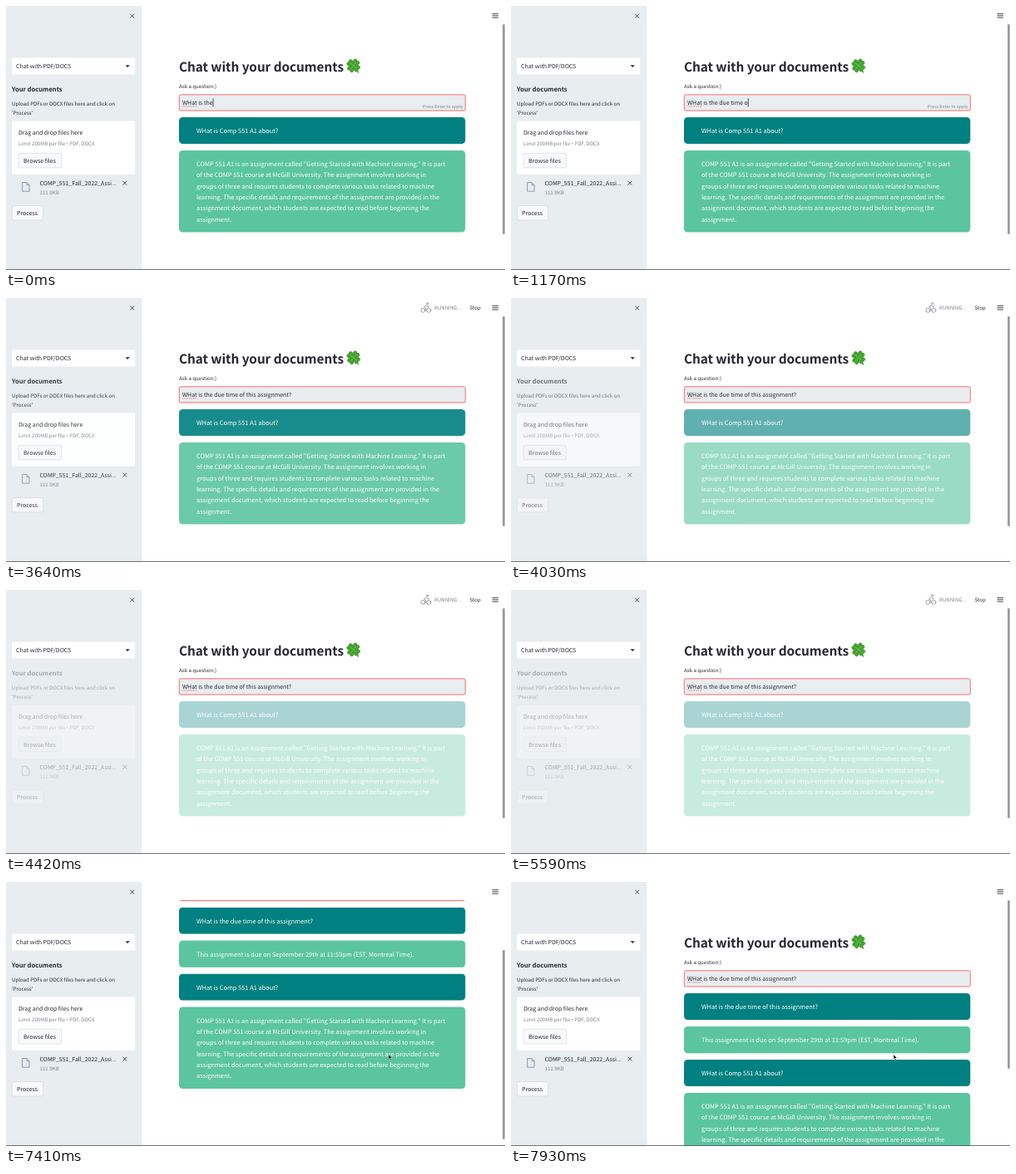
An HTML page that plays this animation: 600x318 px, repeating every 8000 ms.

```html
<!DOCTYPE html>
<html lang="en">
<head>
<meta charset="utf-8">
<title>Chat with your documents</title>
<style>
html, body { margin: 0; width: 100%; height: 100%; overflow: hidden; background: #fff; }
svg { display: block; width: 600px; height: 318px; }
text {
  font-family: "Noto Sans CJK SC", "Noto Sans CJK JP", "Noto Sans CJK", "Open Sans", sans-serif;
  font-size: 6.98px; fill: #262730; white-space: pre; text-rendering: geometricPrecision;
}
.small { font-size: 6.11px; }
.tiny { font-size: 5.24px; }
.card text { font-size: 7.44px; fill: #fff; }
.bold { font-weight: 700; }
.h1 { font-size: 15.4px; letter-spacing: -.08px; }
.h3 { font-size: 7.6px; }
.dim { fill: #7f838e; }
.teal { fill: #008080; }
.green { fill: #5bc5a0; }
.button { fill: #f8f9fb; stroke: #cfd3d7; stroke-width: .6; }
.line { fill: none; stroke: #31333f; stroke-width: .9; }

/* one shared 8 s clock */
.stale, .pushed, .answer, .running, .hint, .pointer, .page, .thumb {
  animation: 8s linear infinite;
}
.stale { animation-name: stale; }
.pushed { animation-name: pushed; animation-timing-function: step-end; }
.answer { animation-name: answer; animation-timing-function: step-end; }
.running { animation-name: running; animation-timing-function: step-end; }
.hint { animation-name: hint; animation-timing-function: step-end; }
.pointer { animation-name: pointer; animation-timing-function: step-end; }
.page { animation-name: page; }
.thumb { animation-name: thumb; }

@keyframes stale {
  0% { opacity: 1; }
  41.5% { opacity: 1; animation-timing-function: ease-in; }
  54% { opacity: .33; animation-timing-function: step-end; }
  78%, 100% { opacity: 1; }
}
@keyframes pushed { 0% { transform: none; } 78%, 100% { transform: translateY(80px); } }
@keyframes answer { 0% { opacity: 0; } 78%, 100% { opacity: 1; } }
@keyframes running { 0% { opacity: 0; } 42.25% { opacity: 1; } 78%, 100% { opacity: 0; } }
@keyframes hint { 0% { opacity: 1; } 36.25%, 100% { opacity: 0; } }
@keyframes pointer { 0% { opacity: 0; } 81.5%, 100% { opacity: 1; } }
@keyframes page {
  0% { transform: none; }
  87% { transform: translateY(0); animation-timing-function: ease-in-out; }
  91.5% { transform: translateY(-103.5px); }
  93.5% { transform: translateY(-103.5px); animation-timing-function: ease-in-out; }
  98%, 100% { transform: translateY(0); }
}
@keyframes thumb {
  0% { y: 22px; height: 253px; animation-timing-function: step-end; }
  78% { y: 22px; height: 203px; }
  87% { y: 22px; height: 203px; animation-timing-function: ease-in-out; }
  91.5% { y: 82px; height: 228px; }
  93.5% { y: 82px; height: 228px; animation-timing-function: ease-in-out; }
  98%, 100% { y: 22px; height: 203px; }
}
</style>
</head>
<body>
<svg viewBox="0 0 600 318">
  <defs>
    <path id="leaf" d="M0 0C-1.4-1.8-4.4-3.6-4-6.2C-3.6-8.4-1-8.6 0-6.8C1-8.6 3.6-8.4 4-6.2C4.4-3.6 1.4-1.8 0 0Z"/>
    <path id="cross" d="M-2.4-2.4L2.4 2.4M2.4-2.4L-2.4 2.4"/>
  </defs>

  <g class="page">
    <text class="bold h1" x="208" y="78.5">Chat with your documents</text>
    <g transform="translate(417.8 71.8) rotate(38)">
      <path d="M0 0Q3.5 3 6 8.6" transform="rotate(-38)" fill="none" stroke="#3f8f25" stroke-width="1.3"/>
      <g fill="#43a52f" stroke="#2c8420" stroke-width=".5">
        <use href="#leaf"/>
        <use href="#leaf" transform="rotate(90)"/>
        <use href="#leaf" transform="rotate(180)"/>
        <use href="#leaf" transform="rotate(270)"/>
      </g>
      <path d="M0-5V5M-5 0H5" stroke="#8ccf68" stroke-width=".6"/>
    </g>
    <text class="small" x="208" y="99">Ask a question:)</text>

    <rect x="208.3" y="106.8" width="344" height="19.2" rx="2" fill="#e8edf0" stroke="#ff4b4b" stroke-width=".8"/>
    <text id="typed" x="212" y="118.9"></text>
    <path d="M212.3 120.9H230" stroke="#e0524f" stroke-width=".8" stroke-dasharray="1 .8"/>
    <path id="caret" d="M0 111.3V121.5" stroke="#262730" stroke-width=".8"/>
    <text class="tiny dim hint" x="501" y="123.3">Press Enter to apply</text>

    <g class="card answer">
      <rect class="teal" x="208" y="134" width="344.3" height="32" rx="4.5"/>
      <text x="229" y="153">WHat is the due time of this assignment?</text>
      <rect class="green" x="208" y="174" width="344.3" height="32.3" rx="4.5"/>
      <text x="229" y="193">This assignment is due on September 29th at 11:59pm (EST, Montreal Time).</text>
    </g>
    <g class="pushed">
      <g class="card stale">
        <rect class="teal" x="208" y="134" width="344.3" height="32" rx="4.5"/>
        <text x="229" y="153">WHat is Comp 551 A1 about?</text>
        <rect class="green" x="208" y="174" width="344.3" height="98.6" rx="4.5"/>
        <g id="summary"></g>
      </g>
    </g>
  </g>

  <rect x="163" width="437" height="22" fill="#fff"/>
  <path class="line" d="M584.5 9.4H592M584.5 11.7H592M584.5 14H592"/>
  <g class="running">
    <g fill="none" stroke="#85878f" stroke-width=".8" stroke-linecap="round" stroke-linejoin="round">
      <circle cx="501.4" cy="14.8" r="2.5"/>
      <circle cx="508.4" cy="14.8" r="2.5"/>
      <circle cx="506.6" cy="6.7" r="1.1"/>
      <path d="M508.6 10.6H506.9L505.3 8.7L502.6 10.9L505 12.6V15.4"/>
    </g>
    <text class="small dim" x="515" y="14">RUNNING...</text>
    <text class="small" x="557.5" y="14">Stop</text>
  </g>
  <rect class="thumb" x="597.2" y="22" width="2.5" height="253" rx="1.2" fill="#929292"/>

  <rect width="163.4" height="318" fill="#e8edf0"/>
  <use class="line" href="#cross" x="151.7" y="12"/>
  <rect x="7" y="62.5" width="148.2" height="20" rx="2" fill="#fff"/>
  <text x="12" y="75.2">Chat with PDF/DOCS</text>
  <path d="M143.6 71.2H148.8L146.2 74Z" fill="#262730"/>

  <g class="stale">
    <text class="bold h3" x="7" y="102.8">Your documents</text>
    <text class="small" x="7" y="120.4">Upload PDFs or DOCX files here and click on</text>
    <text class="small" x="7" y="131.3">'Process'</text>
    <rect x="7" y="138.5" width="148.2" height="64.3" rx="2" fill="#fff"/>
    <text x="15" y="155.4">Drag and drop files here</text>
    <text class="small dim" x="15" y="167.5">Limit 200MB per file <tspan font-family="Open Sans, sans-serif">•</tspan> PDF, DOCX</text>
    <rect class="button" x="15" y="177.3" width="51.6" height="17.6" rx="2"/>
    <text x="21" y="188.6">Browse files</text>
    <path d="M19.6 212.5H25L28 215.6V223.2H19.6ZM25 212.5V215.6H28" fill="none" stroke="#7e95ad" stroke-width=".9" stroke-linejoin="round"/>
    <text x="40.5" y="215.6">COMP_551_Fall_2022_Assi...</text>
    <text class="small dim" x="40.5" y="226.8">111.9KB</text>
    <use class="line" href="#cross" x="142.8" y="213.2"/>
    <rect class="button" x="7.3" y="240.5" width="37.3" height="17.4" rx="2"/>
    <text x="13" y="251.8">Process</text>
  </g>

  <rect y="317.2" width="600" height=".8" fill="#4c5054"/>
  <path class="pointer" d="M460 207.8V213.4L461.3 212.3L462.2 214.3L463.1 213.9L462.2 212H464Z" fill="#000" stroke="#fff" stroke-width=".35"/>
</svg>
<script>
const LOOP = 8000, SLOWDOWN_END = 2340, ENTER = 2900;
const question = "WHat is the due time of this assignment?";
const summary = [
  'COMP 551 A1 is an assignment called "Getting Started with Machine Learning." It is part',
  "of the COMP 551 course at McGill University. The assignment involves working in",
  "groups of three and requires students to complete various tasks related to machine",
  "learning. The specific details and requirements of the assignment are provided in the",
  "assignment document, which students are expected to read before beginning the",
  "assignment."
];
const typed = document.getElementById("typed");
const caret = document.getElementById("caret");

document.getElementById("summary").innerHTML = summary
  .map((line, i) => `<text x="229" y="${193 + i * 13.36}">${line}</text>`).join("");

// Steady typing, then a quicker finish
function typedCount(t) {
  const n = t <= SLOWDOWN_END ? 11 + t / 104 : 33.5 + (t - SLOWDOWN_END) / 70;
  return Math.min(question.length, Math.floor(n));
}

let start;
function draw(now) {
  start ??= now;
  const t = (now - start) % LOOP;
  const text = question.slice(0, typedCount(t));
  if (typed.textContent !== text) typed.textContent = text;
  const x = 212.4 + typed.getComputedTextLength();
  caret.setAttribute("transform", `translate(${x} 0)`);
  caret.style.opacity = t < ENTER ? 1 : 0;
  requestAnimationFrame(draw);
}
requestAnimationFrame(draw);
</script>
</body>
</html>
```
